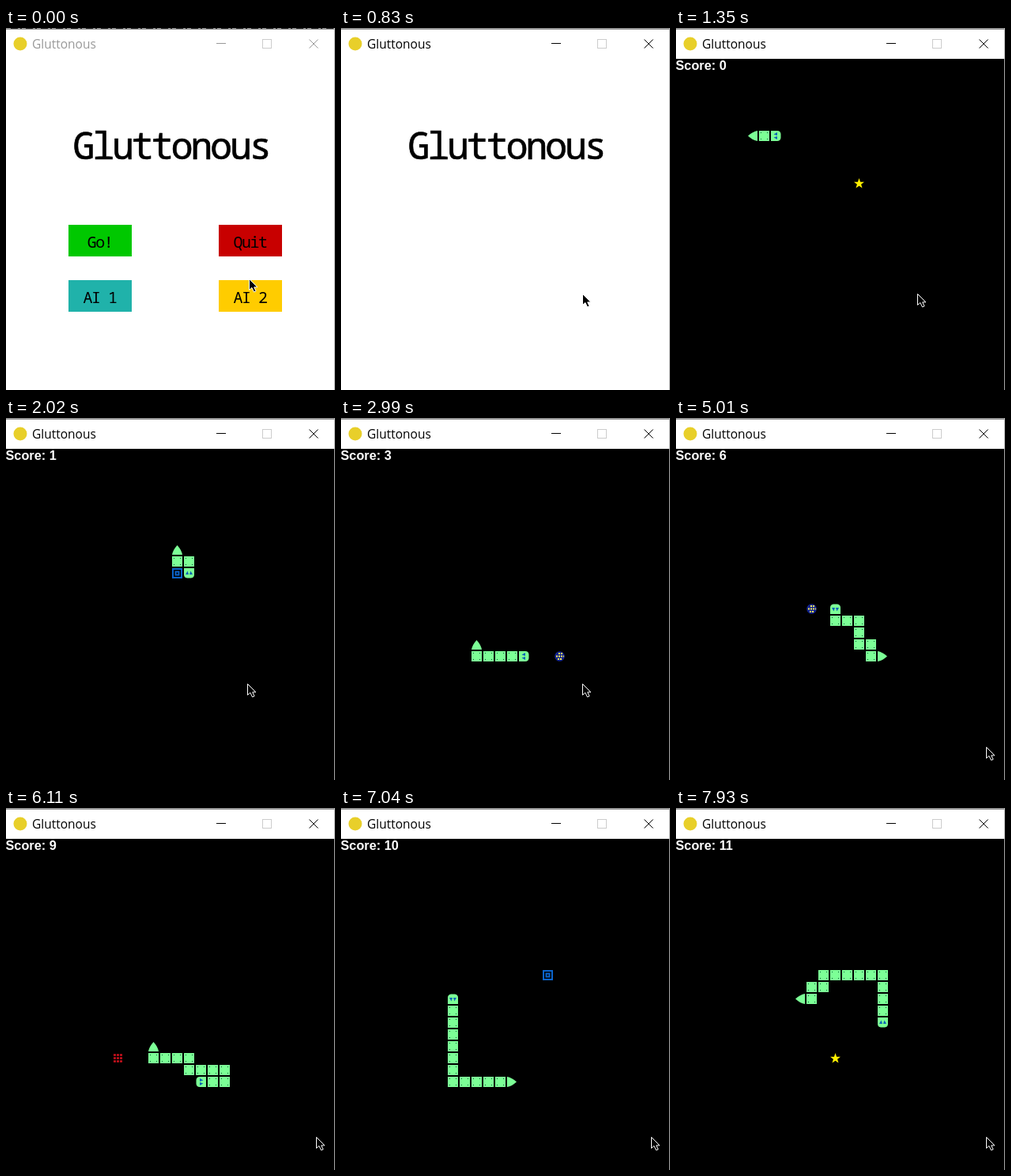
These frames come from a looping animation (416x458 px, 7.99 s). An HTML page:

```html
<!DOCTYPE html>
<html lang="en">
<head>
<meta charset="utf-8">
<title>Gluttonous</title>
<style>
  html, body { margin: 0; width: 100%; height: 100%; overflow: hidden; background: #fff; }
  svg { display: block; }
  .caption { font: 15.5px "Open Sans", "Noto Sans", sans-serif; }
  .menu { font: 20px "Noto Sans Mono", "DejaVu Sans Mono", monospace; letter-spacing: -.072em; text-anchor: middle; }
  .heading { font-size: 47px; stroke: #000; stroke-width: .6; stroke-linejoin: round; }
  .score { font: bold 16.3px "Liberation Sans", Arial, sans-serif; fill: #fff; }
</style>
</head>
<body>
<svg width="416" height="458" viewBox="0 0 416 458">
  <defs>
    <g id="body">
      <rect width="13" height="13" fill="#7cff96"/>
      <path d="M2 2h1v1h-1zM10 2h1v1h-1zM2 10h1v1h-1zM10 10h1v1h-1z" fill="#063"/>
    </g>
    <g id="head">
      <path d="M0 13V5Q0 1 4 .5H9Q13 1 13 5V13Z" fill="#7cff96"/>
      <path d="M2 5H6L4.5 9.5ZM7 5H11L8.5 9.5Z" fill="#0b62b8"/>
    </g>
    <path id="tail" d="M0 13Q1 7 6.5 1Q12 7 13 13Z" fill="#7cff96"/>
    <path id="rings" d="M1 1H12V12H1ZM4.5 4.5H8.5V8.5H4.5Z" fill="none" stroke="#0b63c9" stroke-width="2"/>
    <g id="target" fill="none" stroke="#043">
      <circle cx="6.5" cy="6.5" r="6.5" fill="#00b400" stroke="none"/>
      <circle cx="6.5" cy="6.5" r="3"/>
      <path d="M6.5 1V12M1 6.5H12"/>
    </g>
    <g id="berry">
      <circle cx="6.5" cy="6.5" r="6.3" fill="#12248c"/>
      <path d="M5 3H10M2 6.5H12M4 10H9" stroke="#ffee58" stroke-width="2" stroke-dasharray="2 1"/>
    </g>
    <path id="blocks" d="M1 2.5H12M1 6.5H12M1 10.5H12" stroke="#c8101c" stroke-width="2.4" stroke-dasharray="3 1"/>
    <path id="star" d="M6.5 0L8.1 4.7H13L9.1 7.7L10.5 12.6L6.5 9.7L2.5 12.6L3.9 7.7L0 4.7H4.9Z" fill="#fff000"/>
  </defs>

  <rect width="416" height="458" fill="#fff"/>
  <path d="M0 .5H416" stroke="#999"/>
  <path d="M0 1.5H416" stroke="#888"/>
  <path id="backdrop" d="M6 .5H416" stroke="#222" stroke-dasharray="9 3 2 5"/>
  <circle cx="18" cy="20" r="8.5" fill="#e8cf2a"/>
  <text id="caption" class="caption" x="33" y="26">Gluttonous</text>
  <rect x="324.5" y="14.5" width="11" height="11" fill="none" stroke="#ccc"/>
  <path id="controls" d="M266 19.5H278M383.5 14.5L394.5 25.5M394.5 14.5L383.5 25.5" fill="none"/>

  <g id="menu">
    <text class="menu heading" x="208.5" y="166">Gluttonous</text>
    <g id="buttons"></g>
  </g>
  <g id="game">
    <rect y="39" width="415" height="419"/>
    <text id="score" class="score" x="-.5" y="53"></text>
    <g id="board"></g>
  </g>
  <path d="M415.5 0V458" stroke="#a8a8a8"/>
  <path id="cursor" d="M0 0V14L3.4 11L6 16.5L8.6 15.4L6.2 10.4H10.4Z" fill="#000" stroke="#fff"/>
</svg>
<script>
const LOOP = 7990, HOVER = 60, ACTIVE = 830, START = 1350, DRAG = 3760;
const FIRST_MEAL = 2003, STEP = 63.1;
const $ = id => document.getElementById(id);

// Each leg leads the head to the next food.
const LEGS = [
  ['R8 D3 R1 D1', 'star'],
  ['L1', 'rings'],
  ['L3 D4', 'target'],
  ['D3 R7', 'berry'],
  ['U6 L1 U2 L1', 'blocks'],
  ['D6 R1 D1 R1', 'target'],
  ['D1 L2 U1 L1 U2 L2 U1 L2', 'berry'],
  ['D1 R1 D4 R3', 'rings'],
  ['D1 R3', 'star'],
  ['D1 L9 U2', 'blocks'],
  ['U5 R2 U1 R1 U1 R5', 'rings'],
  ['D7 L4', 'star'],
];
const DIRS = { R: [1, 0], L: [-1, 0], D: [0, 1], U: [0, -1] };
const cells = [[6, 6]];
const foods = LEGS.map(([route, shape]) => {
  for (const run of route.split(' ')) {
    const [dx, dy] = DIRS[run[0]];
    for (let n = +run.slice(1); n--;) {
      const [x, y] = cells[cells.length - 1];
      cells.push([x + dx, y + dy]);
    }
  }
  return { shape, at: cells.length - 1 };
});

const sprite = (id, [x, y], angle = 0) =>
  `<use href="#${id}" transform="translate(${x * 15} ${y * 15 + 40}) rotate(${angle} 6.5 6.5)"/>`;

// Turn of an upright sprite so that it points from a to b
const heading = (a, b) => Math.atan2(b[0] - a[0], a[1] - b[1]) * 180 / Math.PI;

function drawBoard(head) {
  const score = foods.filter(f => f.at <= head).length;
  const tail = head - score - 2;
  const next = foods[score];
  $('board').innerHTML = sprite(next.shape, cells[next.at]) +
    cells.slice(tail + 1, head).map(cell => sprite('body', cell)).join('') +
    sprite('tail', cells[tail], heading(cells[tail + 1], cells[tail])) +
    sprite('head', cells[head], heading(cells[head - 1], cells[head]));
  $('score').textContent = 'Score: ' + score;
}

const button = (id, label, x, y, color) =>
  `<rect id="${id}" x="${x}" y="${y}" width="80" height="40" fill="${color}"/>
   <text class="menu" x="${x + 39.5}" y="${y + 29}">${label}</text>`;
$('buttons').innerHTML = button('go', 'Go!', 79, 249, '#00c800') + button('quit', 'Quit', 269, 249, '#c80000') +
  button('ai1', 'AI 1', 79, 319, '#20b2aa') + button('ai2', 'AI 2', 269, 319, '#ffcc00');

const show = (id, on) => $(id).setAttribute('display', on ? 'inline' : 'none');

// Progress from 0 to 1, in the jumps of the screen's refresh
const progress = (t, start, length) =>
  Math.min(1, Math.max(0, Math.floor((t - start) / 60) * 60 / length));

function pointerAt(t) {
  const enter = progress(t, 0, 180), drag = progress(t, DRAG, 288);
  const x = 307 - 2 * enter + 87 * (1 - (1 - drag) ** 1.4);
  const y = 317 + 19 * enter + 80 * drag;
  return [x, y].map(v => Math.round(v) + .5);
}

let drawn = null;

function render(t) {
  const active = t >= ACTIVE, playing = t >= START;
  show('backdrop', !active);
  show('buttons', !active);
  show('menu', !playing);
  show('game', playing);
  $('caption').setAttribute('fill', active ? '#000' : '#999');
  $('controls').setAttribute('stroke', active ? '#000' : '#999');
  $('ai2').setAttribute('fill', t >= HOVER ? '#ffd700' : '#ffcc00');
  $('cursor').setAttribute('transform', `translate(${pointerAt(t)})`);
  if (playing) {
    const head = foods[0].at + Math.floor((t - FIRST_MEAL) / STEP);
    if (head !== drawn) drawBoard(drawn = head);
  }
}

const begin = performance.now();
function tick() {
  render((performance.now() - begin) % LOOP);
  requestAnimationFrame(tick);
}
tick();
</script>
</body>
</html>
```
